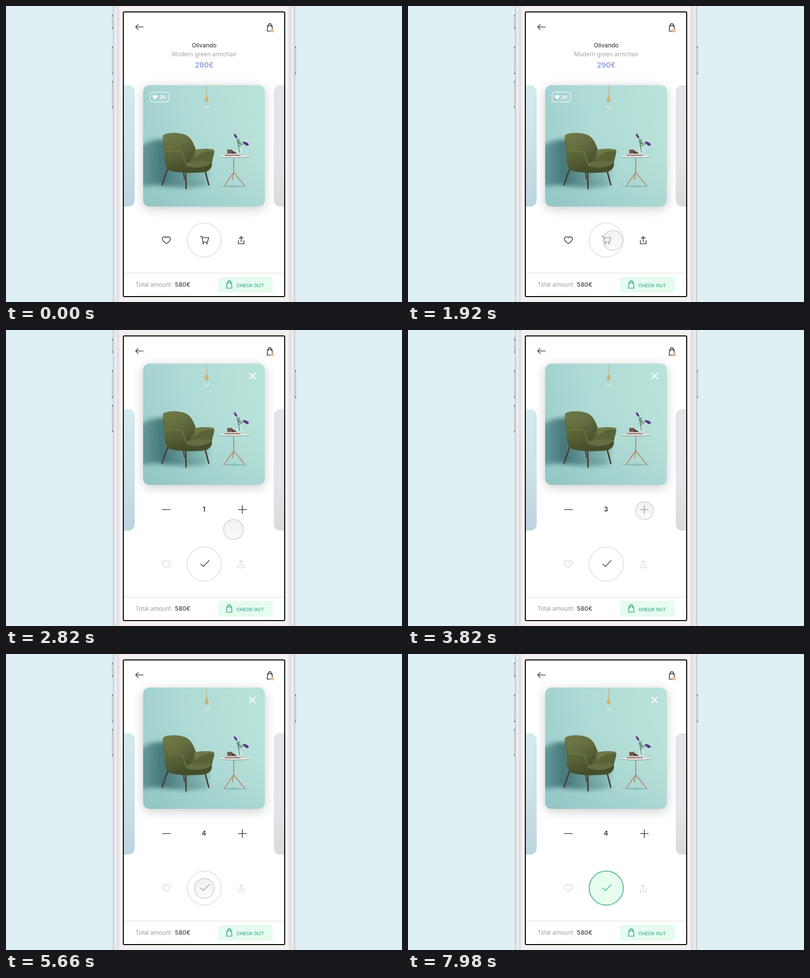
An HTML page that plays this animation: 800 px wide and 600 px high, repeating every 8 s.

```html
<!DOCTYPE html>
<html lang="en">
<head>
<meta charset="utf-8">
<title>Shop card</title>
<style>
  html, body { margin: 0; width: 100%; height: 100%; overflow: hidden; background: #def0f4; }
  svg { display: block; width: 100vw; height: 100vh; font-family: Inter, Roboto, sans-serif; }
  .icon { fill: none; stroke: #4b4b4b; stroke-width: 1.7; stroke-linecap: round; stroke-linejoin: round; }
  .teal { stroke: #4fb09b; }
  .mid { text-anchor: middle; }
</style>
</head>
<body>
<svg viewBox="0 0 800 600">
  <defs>
    <linearGradient id="wall" x1="0" y1=".25" x2="1" y2=".1">
      <stop offset="0" stop-color="#a2d1cf"/><stop offset=".35" stop-color="#afdbd6"/><stop offset="1" stop-color="#b9e2d9"/>
    </linearGradient>
    <linearGradient id="floor" x1="0" y1="1" x2=".6" y2="0">
      <stop offset="0" stop-color="#86bdbc" stop-opacity=".6"/><stop offset="1" stop-color="#a5d5cf" stop-opacity="0"/>
    </linearGradient>
    <linearGradient id="shade">
      <stop offset="0" stop-color="#4c8486" stop-opacity=".6"/>
      <stop offset=".35" stop-color="#35666a" stop-opacity=".85"/>
      <stop offset="1" stop-color="#5c9492" stop-opacity=".35"/>
    </linearGradient>
    <linearGradient id="back" x1="0" y1="0" x2=".7" y2="1">
      <stop offset="0" stop-color="#717b4a"/><stop offset=".5" stop-color="#636d3f"/><stop offset="1" stop-color="#474f2c"/>
    </linearGradient>
    <linearGradient id="body" x1="0" y1="0" x2=".3" y2="1">
      <stop offset="0" stop-color="#68723f"/><stop offset=".5" stop-color="#5c6639"/><stop offset="1" stop-color="#454d2a"/>
    </linearGradient>
    <linearGradient id="leftCard" x1="0" y1="0" x2="0" y2="1">
      <stop offset="0" stop-color="#d3eaee"/><stop offset=".5" stop-color="#cde2ea"/><stop offset="1" stop-color="#bcd4df"/>
    </linearGradient>
    <linearGradient id="rightCard" x1="0" y1="0" x2="0" y2="1">
      <stop offset="0" stop-color="#e5e4e8"/><stop offset=".6" stop-color="#e6e5e9"/><stop offset="1" stop-color="#dad9dc"/>
    </linearGradient>
    <linearGradient id="touch" x1="0" y1="0" x2="0" y2="1">
      <stop offset="0" stop-color="#e6e6e6"/><stop offset="1" stop-color="#f6f6f6"/>
    </linearGradient>
    <clipPath id="screen"><rect x="238" y="13" width="324" height="575"/></clipPath>
    <clipPath id="photo"><rect x="277" y="160.5" width="246" height="246" rx="13"/></clipPath>
    <filter id="soft" x="-30%" y="-30%" width="160%" height="160%"><feGaussianBlur stdDeviation="11"/></filter>
    <filter id="blur" x="-30%" y="-30%" width="160%" height="160%"><feGaussianBlur stdDeviation="5"/></filter>
    <path id="heart" d="M0 7.2C-3 4.8-8 2.2-8-2.3A4.3 4.3 0 0 1 0-4.6 4.3 4.3 0 0 1 8-2.3C8 2.2 3 4.8 0 7.2Z"/>
    <path id="bag" d="M-4.6-4H4.6L5.4 7.5H-5.400ZM-2.600-1.800V-5.200A2.600 2.600 0 0 1 2.600-5.200V-1.800"/>
  </defs>

  <rect width="800" height="600" fill="#def0f4"/>

  <!-- phone -->
  <g fill="none" stroke-width="3">
    <path stroke="#c6cccf" d="M215.500 17V47M215.500 81V139M215.500 151V208M584.500 81V139"/>
    <path stroke="#5d6265" stroke-width="2" d="M215.500 18V21M215.500 43V46M215.500 82V85M215.500 135V138M215.500 152V155M215.500 204V207M584.500 82V85M584.500 135V138"/>
  </g>
  <rect x="216" width="368" height="600" fill="#bfc1c4"/>
  <rect x="217.5" width="365" height="600" fill="#e5e5e8"/>
  <rect x="221" width="358" height="600" fill="#f8f8f9"/>
  <rect x="222.5" width="355" height="600" fill="#e1e0e3"/>
  <rect x="229" width="342" height="600" fill="#f3f0ef"/>
  <rect x="237" y="12" width="326" height="577" rx="2" fill="#fff" stroke="#000" stroke-width="2"/>

  <g clip-path="url(#screen)">
    <path class="icon" d="M277 42.5H262M267 37.5 262 42.5 267 47.5"/>
    <use href="#bag" class="icon" x="533" y="43.5"/>
    <circle cx="537.8" cy="50" r="3.5" fill="#efbd91"/>

    <g class="mid">
      <text x="400.5" y="83.5" font-size="11.8" font-weight="500" fill="#434343">Olivando</text>
      <text x="400.5" y="102" font-size="11.7" fill="#a3a3aa">Modern green armchair</text>
      <text x="400.5" y="125" font-size="14.5" font-weight="600" fill="#8b9fd8">290€</text>
    </g>

    <rect x="200" y="160.5" width="60" height="246" rx="13" fill="url(#leftCard)"/>
    <rect x="541" y="160.5" width="60" height="246" rx="13" fill="url(#rightCard)"/>

    <path id="minus" class="icon" d="M316 364H332"/>
    <path id="plus" class="icon" d="M469.5 364H485.5M477.5 356V372"/>
    <text id="count" class="mid" x="400" y="368.3" font-size="13" font-weight="700" fill="#434343">1</text>

    <g id="card">
      <rect x="277" y="165" width="246" height="246" rx="13" fill="#000" opacity=".2" filter="url(#soft)"/>
      <g clip-path="url(#photo)">
        <rect x="277" y="160" width="246" height="247" fill="url(#wall)"/>
        <rect x="277" y="250" width="246" height="157" fill="url(#floor)"/>
        <path d="M265 288Q295 266 325 272L412 330 406 362 345 365 300 363 265 367Z" fill="url(#shade)" filter="url(#blur)"/>
        <path d="M312 363 364 371 412 364 398 357H325Z" fill="#4b7f7d" opacity=".4" filter="url(#blur)"/>
        <path d="M430 365.5 462 363 488 366 460 368Z" fill="#6fa5a0" opacity=".5"/>

        <!-- lamp -->
        <path d="M405.3 160V183" stroke="#bfae7e"/>
        <path d="M404 182H407V185H408.8V194H402V185H404Z" fill="#d6b266"/>
        <path d="M402.5 194H408.500C409 197 413.300 198 413.300 202.500A7.900 7.900 0 0 1 397.500 202.500C397.500 198 402 197 402.500 194Z" fill="#d3ebe6" opacity=".45" stroke="#7fb0ac" stroke-width=".8"/>
        <path d="M404.300 194 403.500 201H407.300L406.600 194" fill="none" stroke="#8fb0a6" stroke-width=".6"/>

        <!-- chair -->
        <g stroke="#4a3d33" stroke-width="3" stroke-linecap="round">
          <path d="M326 331 315.300 362.500M363 336 363.800 370M402 333 409.600 362.500"/>
          <path d="M358.500 337 360.500 351" stroke-width="2.200"/>
        </g>
        <path d="M317 263C321 256 352 255 366 263 377 270 380 283 385 294L384 322H330Z" fill="url(#back)"/>
        <path d="M381 292C393 289 409 288.500 419 291 424 294 417 308 415 324L372 320C372 312 378 303 381 292Z" fill="#596337"/>
        <path d="M381 292C393 289 409 288.500 419 291 421 292 421 294 420 295 402 293 390 298 383 309Z" fill="#6e7948"/>
        <path d="M362 320C372 313 402 312 416 316L415 327 392 331 367 330Z" fill="#636d40"/>
        <path d="M317 263C319 278 324 289 329 294 343 292 354 293 358 298 362 306 362 318 368 325 385 330 404 327 416 318 417 328 410 336 398 337 376 339 345 339 329 333 322 327 319 312 321 300 318 288 315 272 317 263Z" fill="url(#body)"/>
        <path d="M322 294C334 298 348 290 356 297 361 306 361 318 367 325" fill="none" stroke="#707b48" stroke-width="1.600"/>

        <!-- table -->
        <path d="M460 307V337L441 365M460 337 483 366M460 337 457.500 352" fill="none" stroke="#ba8a70" stroke-width="2" stroke-linecap="round"/>
        <ellipse cx="460.500" cy="305.500" rx="32" ry="2.400" fill="#8f9d98"/>
        <ellipse cx="460.500" cy="304.700" rx="32" ry="2" fill="#e9eeeb"/>
        <path d="M442 301.500H474V304H442Z" fill="#a37b70"/>
        <path d="M445 299H472V301.500H445Z" fill="#d8cec6"/>
        <path d="M447 291H457V299H447Z" fill="#75544b"/>
        <path d="M457 293 467 299H456Z" fill="#453d3d"/>
        <circle cx="472" cy="294" r="8" fill="#d5ece7" opacity=".5" stroke="#86b0ac" stroke-width=".7"/>
        <path d="M472 297 467 270M470 284 482 278" fill="none" stroke="#4b7055" stroke-width="1.300"/>
        <path d="M466 273 473 269 471 275 477 279 469 281Z" fill="#6d8f7a"/>
        <path d="M460 259Q466 259 467.500 269 461 267 460 259ZM477 275.500Q487 274 491 281 486 286 482 280Z" fill="#623082"/>
      </g>
      <g id="badge">
        <rect x="291" y="174.5" width="37.5" height="20" rx="5" fill="none" stroke="#fff" stroke-opacity=".75" stroke-width="1.4"/>
        <use href="#heart" fill="#fff" transform="translate(301.3 184.5) scale(.58)"/>
        <text x="310" y="187.8" font-size="9.3" font-weight="700" fill="#fff">26</text>
      </g>
      <path id="close" d="M-5.8-5.8 5.8 5.8M5.8-5.8-5.8 5.8" fill="none" stroke="#fff" stroke-width="2" stroke-linecap="round"/>
    </g>

    <!-- actions -->
    <g id="side" class="icon">
      <use href="#heart" x="324" y="474.5"/>
      <path d="M469.5 475.5V482H480.800V475.5M475.200 478V467.500M471.500 471.200 475.200 467.500 478.900 471.200"/>
    </g>
    <circle id="disc" cx="400.5" cy="474.5" r="34.5" fill="#e7fdee"/>
    <circle cx="400.5" cy="474.5" r="34.5" fill="none" stroke="#e5e5e6" stroke-width="2"/>
    <circle id="ring" cx="400.5" cy="474.5" r="34.5" fill="none" stroke="#62b9a4" stroke-width="2" pathLength="100" transform="rotate(-90 400.5 474.5)"/>
    <g id="cart" class="icon">
      <path d="M392.5 467H395.5L398 478.5H407L409.5 469.5H396"/>
      <circle cx="398.5" cy="481.3" r=".9"/><circle cx="406" cy="481.3" r=".9"/>
    </g>
    <path id="check" class="icon" d="M393.5 474.5 398.8 479.5 410.3 467.5"/>

    <!-- footer -->
    <path d="M238 541.5H562" stroke="#e7e7e8" stroke-width="1.5"/>
    <text x="261.5" y="568.5" font-size="11.7" fill="#9c9ca2">Total amount:</text>
    <text x="341.3" y="568.5" font-size="12.2" font-weight="500" fill="#434343">580€</text>
    <rect x="428" y="549" width="111" height="32" rx="5" fill="#e6fcee"/>
    <use href="#bag" class="icon teal" x="451" y="564.5"/>
    <text x="465.5" y="569.5" font-size="9.3" font-weight="600" fill="#4bb09a">CHECK OUT</text>

    <circle id="cursor" r="20" fill="url(#touch)" fill-opacity=".55" stroke="#d2d2d2" stroke-opacity=".85" stroke-width="2"/>
  </g>
</svg>
<script>
const LOOP = 8000;
const $ = id => document.getElementById(id);
const set = (id, attrs) => { for (const k in attrs) $(id).setAttribute(k, attrs[k]); };
const ramp = (t, a, b) => Math.min(1, Math.max(0, (t - a) / (b - a)));
const ease = (t, a, b) => (1 - Math.cos(Math.PI * ramp(t, a, b))) / 2;
const mix = (a, b, p) => a + (b - a) * p;

// start, end, from, to, bend of the path
const moves = [
  [1380, 2030, [590, 475], [401, 475], [0, 0]],
  [2460, 3040, [401, 475], [478, 366], [13, 10]],
  [5150, 5650, [478, 366], [401, 475], [8, 4]],
  [6150, 6700, [401, 475], [600, 471], [0, 0]]
];
const plusTaps = [3300, 3800, 4300];
const taps = [2120, ...plusTaps, 5900];

function cursorAt(t) {
  const [a, b, from, to, bend] = moves.filter(m => t >= m[0]).pop() || moves[0];
  const p = ease(t, a, b);
  return [0, 1].map(i => mix(from[i], to[i], p) + 2 * p * (1 - p) * bend[i]);
}

function draw(t) {
  const open = ease(t, 2170, 2595);
  const done = ease(t, 7370, 7650);
  const load = ease(t, 6050, 7370);

  set('card', { transform: `translate(0 ${-92.5 * open})` });
  const s = 1 - 0.15 * open;
  set('badge', {
    opacity: Math.max(0, 1 - 1.25 * open),
    transform: `translate(309.7 184.5) scale(${s}) translate(-309.7 -184.5)`
  });
  set('close', { opacity: open ** 1.5, transform: `translate(498 185.5) scale(${mix(0.3, 1, open)})` });

  set('minus', { opacity: open, transform: `translate(${10 * (1 - open)} 0)` });
  set('plus', { opacity: open, transform: `translate(${-10 * (1 - open)} 0)` });
  $('count').textContent = 1 + plusTaps.filter(x => t >= x).length;

  set('side', { opacity: 1 - 0.82 * open });
  set('cart', { opacity: 1 - open });
  const ink = [[75, 79], [75, 176], [75, 155]].map(c => Math.round(mix(c[0], c[1], done)));
  set('check', { opacity: Math.min(1, 1.4 * open), style: `stroke:rgb(${ink})` });
  set('disc', { opacity: done });
  set('ring', { 'stroke-dasharray': `${100 * load} 200`, opacity: load > 0 ? 1 : 0 });

  const [x, y] = cursorAt(t);
  const press = Math.max(...taps.map(c => 1 - Math.min(1, Math.abs(t - c) / 130)));
  set('cursor', { transform: `translate(${x} ${y}) scale(${1 - 0.12 * press})` });
}

const start = performance.now();
function tick(now) {
  draw(Math.max(0, now - start) % LOOP);
  requestAnimationFrame(tick);
}
draw(0);
requestAnimationFrame(tick);
</script>
</body>
</html>
```
